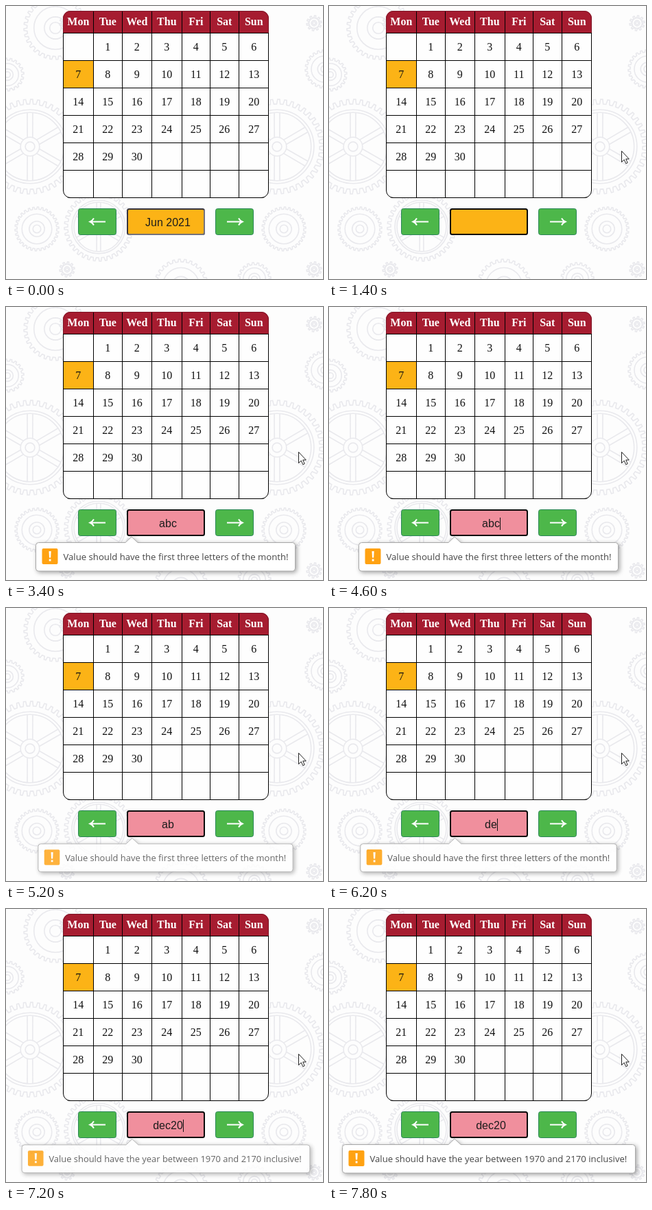
Recreate the animation shown at these times as an HTML page. Size 462x398 px, loop 8 s.

```html
<!DOCTYPE html>
<html lang="en">
<head>
<meta charset="utf-8">
<title>Calendar</title>
<style>
  html, body { margin: 0; width: 100%; height: 100%; overflow: hidden; background: #fdfdfd; }
  svg { display: block; }
  .gear { fill: none; stroke: #e9e9ed; stroke-width: 1.6; }
  .cell { font: 16px "Liberation Serif", serif; text-anchor: middle; fill: #111; }
  .head { font-weight: bold; fill: #fff; }
  .field { font: 16px "Liberation Sans", sans-serif; text-anchor: middle; fill: #1c1c1c; }
  .tip { font: 13.15px "Open Sans", sans-serif; fill: #454545; }
  #bubble { transform-origin: 232px 362px; filter: drop-shadow(2px 2px 3px rgba(0, 0, 0, .35)); }
</style>
</head>
<body>
<svg id="stage" width="462" height="398" viewBox="0 0 462 398">
  <g id="gears" class="gear"></g>
  <g id="table">
    <clipPath id="round"><rect x="83" y="7" width="300" height="273" rx="11"/></clipPath>
    <g clip-path="url(#round)">
      <rect x="83" y="7" width="300" height="273" fill="#fefefe"/>
      <rect x="83" y="7" width="300" height="32" fill="#a61c30"/>
      <rect x="84" y="80" width="43" height="39" fill="#fcb316"/>
      <path id="lines" stroke="#000" fill="none"/>
    </g>
    <path d="M83.5 39V269a10.5 10.5 0 0 0 10.5 10.5H372a10.5 10.5 0 0 0 10.5-10.5V39" fill="none" stroke="#000"/>
    <path d="M83.5 39V18a10.5 10.5 0 0 1 10.5-10.5H372a10.5 10.5 0 0 1 10.5 10.5V39" fill="none" stroke="#7d1526"/>
  </g>
  <g fill="#4db74a" stroke="#2b8658">
    <rect x="105.5" y="295.5" width="55" height="38" rx="3"/>
    <rect x="305.5" y="295.5" width="55" height="38" rx="3"/>
  </g>
  <g fill="none" stroke="#fff" stroke-width="2">
    <path d="M145 314.500H123M128 309.500Q126 313 122.500 314.500Q126 316 128 319.500"/>
    <path d="M322 314.500H344M339 309.500Q341 313 344.500 314.500Q341 316 339 319.500"/>
  </g>
  <rect id="box" x="177" y="296" width="112" height="37" rx="2.500" stroke-width="2"/>
  <path id="bevel" d="M178 333H287a2 2 0 0 0 2-2V297" fill="none" stroke="#74727a" stroke-width="2"/>
  <text id="value" class="field" x="236" y="321"></text>
  <rect id="caret" y="307" width="1" height="18" fill="#111"/>
  <g id="bubble">
    <path id="frame" fill="#fff" stroke="#a8a8a8"/>
    <g id="icon">
      <rect y="352" width="23" height="23" rx="2" fill="#ffa212"/>
      <path d="M10 356h3.200l-.5 9.500h-2.200zM10.200 367.500h2.800v3h-2.800z" fill="#fff"/>
    </g>
    <text id="tip" class="tip" y="369"></text>
  </g>
  <path id="mouse" d="M.5.5V16.500L4.200 13L6.700 18.700L9.200 17.600L6.700 12H11.300Z" fill="#fff" stroke="#222"/>
</svg>
<script>
const NS = "http://www.w3.org/2000/svg";
const $ = id => document.getElementById(id);

function add(parent, tag, attrs, text = "") {
  const el = document.createElementNS(NS, tag);
  for (const key in attrs) el.setAttribute(key, attrs[key]);
  el.textContent = text;
  parent.appendChild(el);
}

// Background gears
function gear(x, y, r, teeth, spokes = 0) {
  const step = 2 * Math.PI / teeth;
  const at = (rad, a) => `${(x + rad * Math.cos(a)).toFixed(1)} ${(y + rad * Math.sin(a)).toFixed(1)}`;
  const inner = r - Math.max(3, r * .1);
  let d = "";
  for (let i = 0; i < teeth; i++) {
    const a = i * step;
    d += (i ? "L" : "M") + at(inner, a) + "L" + at(inner, a + step * .45) +
      "L" + at(r, a + step * .58) + "L" + at(r, a + step * .88);
  }
  d += "Z";
  for (let i = 0; i < spokes; i++) {
    const a = Math.PI / 2 + i * 2 * Math.PI / spokes;
    for (const side of [-1, 1])
      d += "M" + at(r * .2, a + side * .28) + "L" + at(r * .72, a + side * .08);
  }
  add($("gears"), "path", { d });
  const rings = spokes ? [.78, .72, .2, .1] : [.68, .35, .18];
  for (const k of rings) add($("gears"), "circle", { cx: x, cy: y, r: r * k });
}

for (const dx of [0, 360]) {
  gear(35 + dx, 205, 69, 42, 6);
  gear(45 + dx, 325, 32, 30);
  gear(89 + dx, 25, 11, 10);
  gear(89 + dx, 384, 11, 10);
}
gear(72, 32, 46, 32);
gear(2, 100, 24, 20);
gear(464, 92, 28, 24);
gear(135, 322, 50, 36, 6);
gear(255, 408, 39, 28);
gear(362, 398, 24, 20);

// Calendar
const days = ["Mon", "Tue", "Wed", "Thu", "Fri", "Sat", "Sun"];
const edges = [83, 127, 169, 212, 256, 297, 339, 383];
const mid = col => (edges[col] + edges[col + 1]) / 2 + .3;
let lines = "";
edges.slice(1, 7).forEach(x => lines += `M${x + .5} 7V280`);
for (let y = 39; y < 280; y += 40) lines += `M83 ${y + .5}H383`;
$("lines").setAttribute("d", lines);
days.forEach((day, i) => add($("table"), "text", { class: "cell head", x: mid(i), y: 28 }, day));
for (let n = 1; n <= 30; n++)
  add($("table"), "text", { class: "cell", x: mid(n % 7), y: 65 + 40 * Math.floor(n / 7) }, n);

// Timeline
const LOOP = 8000, TICK = 200, FADE = 200;
const LETTERS = { text: "Value should have the first three letters of the month!", x: 43, w: 379 };
const YEAR = { text: "Value should have the year between 1970 and 2170 inclusive!", x: 19, w: 428 };
const keys = [
  [0, "Jun 2021"], [600, ""],
  [2900, "a", LETTERS], [3050, "ab", LETTERS], [3200, "abc", LETTERS],
  [5036, "ab", LETTERS], [5320, "a", LETTERS], [5600, ""],
  [5800, "d", LETTERS], [6024, "de", LETTERS],
  [6400, "dec", YEAR], [6720, "dec2", YEAR], [7034, "dec20", YEAR]
];
const caretOn = [[600, 1400], [2000, 2400], [3000, 3200], [3600, 4000], [4600, 5000], [5400, 7600]];
const path = [[200, 222, 365], [400, 238, 312], [800, 238, 312], [1000, 318, 268], [1200, 419, 214], [1400, 426, 211]];

const last = (list, t) => list.filter(row => row[0] <= t).pop();

function show(id, on) { $(id).style.display = on ? "" : "none"; }

function drawBubble(tip, p) {
  show("bubble", tip);
  if (!tip) return;
  const { x, w, text } = tip;
  $("frame").setAttribute("d", `M${x + 4.5} 343.500H174L183 335L192 343.500H${x + w - 4.5}q4 0 4 4V381q0 4 -4 4` +
    `H${x + 4.5}q-4 0 -4 -4V347.500q0 -4 4 -4Z`);
  $("icon").setAttribute("transform", `translate(${x + 9.5} 0)`);
  $("tip").setAttribute("x", x + 40.5);
  $("tip").textContent = text;
  $("bubble").style.opacity = p;
  $("bubble").style.transform = `scale(${.9 + .1 * p})`;
}

function draw(t) {
  const [start, value, tip] = last(keys, t);
  const focused = t >= 600;
  $("value").textContent = value;
  $("box").setAttribute("fill", tip ? "#f08f9d" : "#fcb316");
  $("box").setAttribute("stroke", focused ? "#0b0b0b" : "#38363f");
  show("bevel", !focused);

  const width = value ? $("value").getComputedTextLength() : 0;
  $("caret").setAttribute("x", Math.round(236 + width / 2));
  show("caret", caretOn.some(([a, b]) => t >= a && t < b));

  drawBubble(tip, Math.min(1, (t - start) / FADE));

  const from = last(path, t);
  show("mouse", from);
  if (from) {
    const to = path[path.indexOf(from) + 1] || from;
    const k = to === from ? 0 : (t - from[0]) / (to[0] - from[0]);
    const pos = i => from[i] + (to[i] - from[i]) * k;
    $("mouse").setAttribute("transform", `translate(${pos(1)} ${pos(2)})`);
  }
}

const begin = performance.now();
let shown = -1;
function frame() {
  const t = Math.floor((performance.now() - begin) % LOOP / TICK) * TICK;
  if (t !== shown) draw(shown = t);
  requestAnimationFrame(frame);
}
frame();
</script>
</body>
</html>
```
